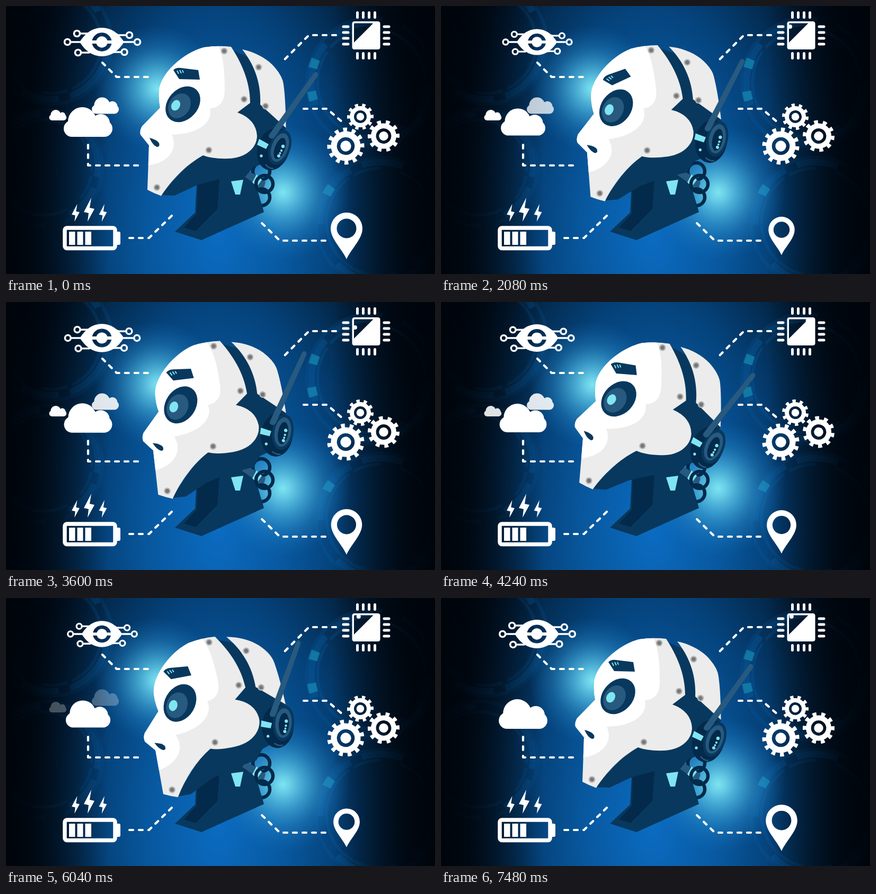
An HTML page that plays this animation: 810x506 px, repeating every 7.52 s.

```html
<!DOCTYPE html>
<html lang="en">
<head>
<meta charset="utf-8">
<title>Robot head</title>
<style>
html, body { margin: 0; width: 100%; height: 100%; overflow: hidden; background: #000711; }
svg { display: block; width: 100vw; height: 100vh; }
.w { fill: #fff; }
.d { fill: #08385d; }
.k { fill: #032a4b; }
.b { fill: #28597f; }
.c { fill: #80e5f2; }
.line { fill: none; stroke: #fff; }
</style>
</head>
<body>
<svg viewBox="0 0 810 506" preserveAspectRatio="none">
  <defs>
    <radialGradient id="bg" gradientUnits="userSpaceOnUse" cx="0" cy="0" r="1" gradientTransform="translate(400 420) scale(430 820)">
      <stop offset="0" stop-color="#0b6cc2"/>
      <stop offset=".3" stop-color="#08589f"/>
      <stop offset=".52" stop-color="#05427a"/>
      <stop offset=".72" stop-color="#03284a"/>
      <stop offset=".9" stop-color="#010f1f"/>
      <stop offset="1" stop-color="#000711"/>
    </radialGradient>
    <linearGradient id="sides">
      <stop offset="0" stop-color="#00050c"/>
      <stop offset=".06" stop-color="#00050c" stop-opacity=".85"/>
      <stop offset=".24" stop-color="#00050c" stop-opacity="0"/>
      <stop offset=".76" stop-color="#00050c" stop-opacity="0"/>
      <stop offset=".94" stop-color="#00050c" stop-opacity=".85"/>
      <stop offset="1" stop-color="#00050c"/>
    </linearGradient>
    <radialGradient id="glow">
      <stop offset="0" stop-color="#7de4f0"/>
      <stop offset=".12" stop-color="#6cd3ea" stop-opacity=".95"/>
      <stop offset=".35" stop-color="#4fb9e0" stop-opacity=".7"/>
      <stop offset=".65" stop-color="#2f93ce" stop-opacity=".35"/>
      <stop offset="1" stop-color="#1676c0" stop-opacity="0"/>
    </radialGradient>
    <g id="cloud" class="w">
      <rect y="25" width="92" height="31" rx="15.5"/>
      <circle cx="35" cy="27" r="27"/>
      <circle cx="70" cy="30" r="17"/>
    </g>
    <path id="spark" class="w" d="M4-26-10 1-1 3-3 19 10-5 1-7Z"/>
    <clipPath id="faceClip"><use href="#face"/></clipPath>
  </defs>

  <rect width="810" height="506" fill="url(#bg)"/>
  <g id="huds"></g>
  <rect width="810" height="506" fill="url(#sides)"/>
  <circle cx="286" cy="156" r="120" fill="url(#glow)"/>
  <circle cx="523" cy="352" r="128" fill="url(#glow)"/>

  <g class="line" stroke-width="4.2" stroke-linecap="round" stroke-linejoin="round" stroke-dasharray="7 11">
    <path d="M182 107 209 134H272"/>
    <path d="M155 262V301H254"/>
    <path d="M233 438H270L316 393"/>
    <path d="M623 55H572L523 104"/>
    <path d="M562 194H606L636 220"/>
    <path d="M603 443H517L479 406"/>
  </g>

  <g id="eyeIcon">
    <path class="w" fill-rule="evenodd" d="M139 68Q156 41 181 41T223 68Q206 95 181 95T139 68ZM162.500 65A19 19 0 0 1 199.500 65H191.500A11 11 0 0 0 170.500 65ZM162.500 71A19 19 0 0 0 199.500 71H191.500A11 11 0 0 1 170.500 71Z"/>
    <g class="line" stroke-width="3.600">
      <path d="M122 68H142M140 52H156L164 49M227 55H212L202 50M142 88H156L164 86M217 87H206L198 88M222 68H241"/>
      <g id="nodes"></g>
    </g>
  </g>

  <use id="cloudLeft" href="#cloud" transform="translate(81.500 196) scale(.355)"/>
  <use id="cloudRight" href="#cloud" transform="translate(162 172.500) scale(.555)"/>
  <g id="cloudBig"><use href="#cloud" x="109" y="191"/></g>

  <g>
    <rect class="line" x="111" y="419" width="95" height="38.500" rx="4" stroke-width="7.500"/>
    <path class="w" d="M209 426H213Q216 426 216 429V448Q216 451 213 451H209Z"/>
    <path class="w" d="M119 426h11.500v25h-11.500ZM134.500 426h11v25h-11ZM149.500 426h11.500v25h-11.500Z"/>
    <use href="#spark" transform="translate(157 388)"/>
    <use href="#spark" transform="translate(131.500 393) scale(.74)"/>
    <use href="#spark" transform="translate(183 393) scale(.74)"/>
  </g>

  <path id="pins" class="line" stroke-width="5" stroke-linecap="round"/>
  <path class="w" fill-rule="evenodd" d="M658 29H702Q706.500 29 706.500 33.500V77.500Q706.500 82 702 82H658Q653.500 82 653.500 77.500V33.500Q653.500 29 658 29ZM658.500 32.500Q657 32.500 657 34V69L693.500 32.500Z"/>
  <circle id="chipDot" class="w" r="4"/>

  <g id="gears"></g>

  <path id="pin" class="w" fill-rule="evenodd" d="M643 478C634 458 613 440 613 420A30 30 0 0 1 673 420C673 440 652 458 643 478ZM624.500 420A18.500 18.500 0 1 0 661.500 420 18.500 18.500 0 1 0 624.500 420Z"/>

  <g fill="none" stroke="#032a4b" stroke-width="6.500">
    <circle cx="482" cy="312" r="16"/>
    <circle cx="482" cy="361" r="16"/>
  </g>
  <path class="d" d="M362 300H448L474 345 487 389 369 442 319 426 357 390Z"/>
  <path class="k" d="M363 300H405L399 383 358 425 336 418 360 392Z"/>
  <path class="c" d="M425 331 448 328 442 356H433Z"/>
  <path class="b" d="M453 309 474 320 466 333 446 319Z"/>
  <path class="b" d="M479 326 490 332 487 343 473 340Z"/>
  <path class="c" d="M473 318 483 328 474 341 465 333Z"/>
  <circle cx="488" cy="336" r="16" fill="none" stroke="#032a4b" stroke-width="6.500"/>

  <g id="head">
    <path class="d" d="M420 80 452 94 480 110 500 180 529 229 502 293 468 303 452 322 403 327 361 338 318 358 290 357 372 270 430 190Z"/>
    <path fill="#ececec" d="M446 82C466 86 488 96 503 111Q522 131 524 148 528 176 528.500 230L480 186C482 148 470 112 446 82Z"/>
    <path id="face" fill="#ececec" d="M425 77Q400 74 374 78C335 88 290 128 289 162Q288 178 291 192L257 227Q252 235 254 243L270 263 267 347Q280 354 293 358.500C313 328 340 300 372 282Q390 289 420 288C455 287 474 266 474 245Q472 214 437 201L461 183C461 142 444 106 425 77Z"/>
    <path class="w" clip-path="url(#faceClip)" d="M240 60H391C411 85 413 118 413 160Q412 192 385 193C391 219 365 242 313 243C326 272 305 298 262 302H240Z"/>
    <path class="d" d="M271 249Q286 253 289 259 291 266 285 266 277 263 271 249Z"/>
    <g id="brow">
      <path class="d" d="M316 121Q321 116 330 117L363 121 366 139 327 138Z"/>
      <path d="M323 122 326 128M328 121 331 127M333 121 335 126" stroke="#80e5f2" stroke-width="2"/>
    </g>
    <ellipse class="d" rx="28.500" ry="37.500" transform="translate(334 185.500) rotate(42)"/>
    <ellipse class="b" rx="19.500" ry="25" transform="translate(327.500 188.500) rotate(34)"/>
    <ellipse class="c" rx="8" ry="10.500" transform="translate(320.500 187.500) rotate(28)"/>
    <g id="rivets"></g>

    <g id="ear">
      <ellipse class="k" rx="30" ry="41" transform="translate(505 270) rotate(18)"/>
      <ellipse class="d" rx="20" ry="34" transform="translate(517 267) rotate(20)"/>
      <ellipse class="b" rx="15.500" ry="28" transform="translate(517 267) rotate(20)"/>
      <ellipse class="k" rx="9.500" ry="21" transform="translate(517 269) rotate(20)"/>
      <path class="c" d="M478 251 496 261 491 270 474 262Z"/>
      <path d="M490 299Q496 307 505 307" fill="none" stroke="#28597f" stroke-width="2.500"/>
      <g class="c">
        <circle cx="523" cy="265" r="3.200"/><circle cx="520" cy="273" r="2.200"/>
        <circle cx="517.500" cy="278" r="2"/><circle cx="515" cy="283" r="3"/>
        <circle cx="482" cy="283" r="2.700"/>
      </g>
      <path class="b" d="M498 241 581 127Q585 123 588 126 591 129 588 133L508 247Q503 253 498 249 494 246 498 241Z"/>
    </g>
  </g>
</svg>
<script>
const LOOP = 7520, PULSE = LOOP / 2;
const $ = id => document.getElementById(id);
const fill = (id, items, draw) => { $(id).innerHTML = items.map(draw).join(''); };

fill('nodes', [[116, 68], [248, 68], [134, 52], [233, 55], [136, 88], [223.5, 87]],
  ([x, y]) => `<circle cx="${x}" cy="${y}" r="5.500"/>`);

fill('rivets', [[412, 85], [477, 115.5], [449.5, 176], [490, 189], [383, 272], [285, 342.5]],
  ([x, y]) => `<circle cx="${x}" cy="${y}" r="6.300" fill="#b5b5b5"/><circle cx="${x}" cy="${y}" r="3.800" fill="#777"/>`);

$('pins').setAttribute('d', [0, 1, 2, 3].map(i => {
  const x = 663.5 + 11 * i, y = 39 + 11 * i;
  return `M${x} 12.500v9M${x} 89.500v9M637 ${y}h9M714 ${y}h9`;
}).join(''));

// Faint interface rings; tiles are the angles of the brighter pieces
const ring = (r, width, dash, opacity, turn, color = '#0b67ae') =>
  `<circle r="${r}" fill="none" stroke="${color}" stroke-width="${width}" pathLength="360"
    stroke-dasharray="${dash}" opacity="${opacity}" transform="rotate(${turn})"/>`;
const huds = [
  { x: 85, y: 70, r: 118, turn: 0, tiles: [] },
  { x: 72, y: 305, r: 113, turn: 300, tiles: [] },
  { x: 690, y: 145, r: 125, turn: 150, tiles: [194, 163] },
  { x: 707, y: 408, r: 125, turn: 170, tiles: [207] }
];
fill('huds', huds, ({ x, y, r, turn, tiles }) => `<g transform="translate(${x} ${y})">` +
  ring(r - 3, 7, '130 18 70 12', .16, turn) +
  ring(r - 12, 12, '62 12 40 90', .3, turn + 8) +
  ring(r - 23, 6, '85 6 30 20', .22, turn - 20) +
  tiles.map(a => ring(r - 11, 17, '9 351', .55, a, '#1d9cc0')).join('') + '</g>');

const gears = [
  { x: 641.5, y: 264.5, r: 35, teeth: 12, dir: 1 },
  { x: 713, y: 245.5, r: 30, teeth: 10, dir: -1 },
  { x: 669, y: 209, r: 25, teeth: 10, dir: -1 }
];
fill('gears', gears, ({ r, teeth }) => `<g class="line">
  <circle r="${r * .86}" stroke-width="${r * .28}" pathLength="${teeth * 2}" stroke-dasharray=".9 1.1"/>
  <circle r="${r * .64}" stroke-width="${r * .32}"/>
  <circle r="${r * .29}" fill="#fff" stroke="none"/></g>`);
const gearNodes = [...$('gears').children];

const clamp = (v, low, high) => Math.min(high, Math.max(low, v));
const ease = (t, from, to) => (1 - Math.cos(Math.PI * clamp((t - from) / (to - from), 0, 1))) / 2;
const pulse = (t, depth) => 1 - depth * Math.abs(Math.sin(Math.PI * t / PULSE));

// Nod down, look up, nod down again, return to rest
const headTurn = t => -14 * ease(t, 1280, 2960) + 22.5 * ease(t, 2960, 4900)
  - 22.5 * ease(t, 4900, 6300) + 14 * ease(t, 6300, 7480);
const browTurn = t => -20 * (ease(t, 500, 1280) - ease(t, 2300, 3700));

// Runs left along the top edge of the chip window, then down its side
function chipDot(t) {
  const lap = 1377, speed = .0633;
  const way = t < 1500 ? 0 : speed * ((t + 1321) % lap);
  return [Math.max(659, 696 - way), 35 + clamp(way - 37, 0, 39)];
}

const move = (id, value) => $(id).setAttribute('transform', value);
const turn = (id, angle, x, y) => move(id, `rotate(${angle} ${x} ${y})`);
const grow = (id, s, x, y) => move(id, `translate(${x} ${y}) scale(${s}) translate(${-x} ${-y})`);

function render(t) {
  const nod = headTurn(t);
  turn('head', nod, 391, 218);
  turn('ear', .3 * Math.min(nod, 0), 465, 262);
  turn('brow', browTurn(t), 342, 128);

  grow('eyeIcon', pulse(t, .092), 182, 68);
  grow('pin', pulse(t, .18), 643, 434);
  grow('cloudBig', pulse(t, .09), 155, 219);

  const fade = 1 - ease(t, 3300, 7480);
  const dim = .25 * Math.max(0, Math.sin(Math.PI * Math.min(t / 4240, 1)));
  $('cloudLeft').setAttribute('opacity', fade);
  $('cloudRight').setAttribute('opacity', fade * (1 - dim));

  gears.forEach(({ x, y, dir }, i) =>
    gearNodes[i].setAttribute('transform', `translate(${x} ${y}) rotate(${dir * 360 * t / LOOP - 9})`));
  move('chipDot', `translate(${chipDot(t)})`);
}

const start = performance.now();
function frame() {
  render((performance.now() - start) % LOOP);
  requestAnimationFrame(frame);
}
render(0);
requestAnimationFrame(frame);
</script>
</body>
</html>
```
